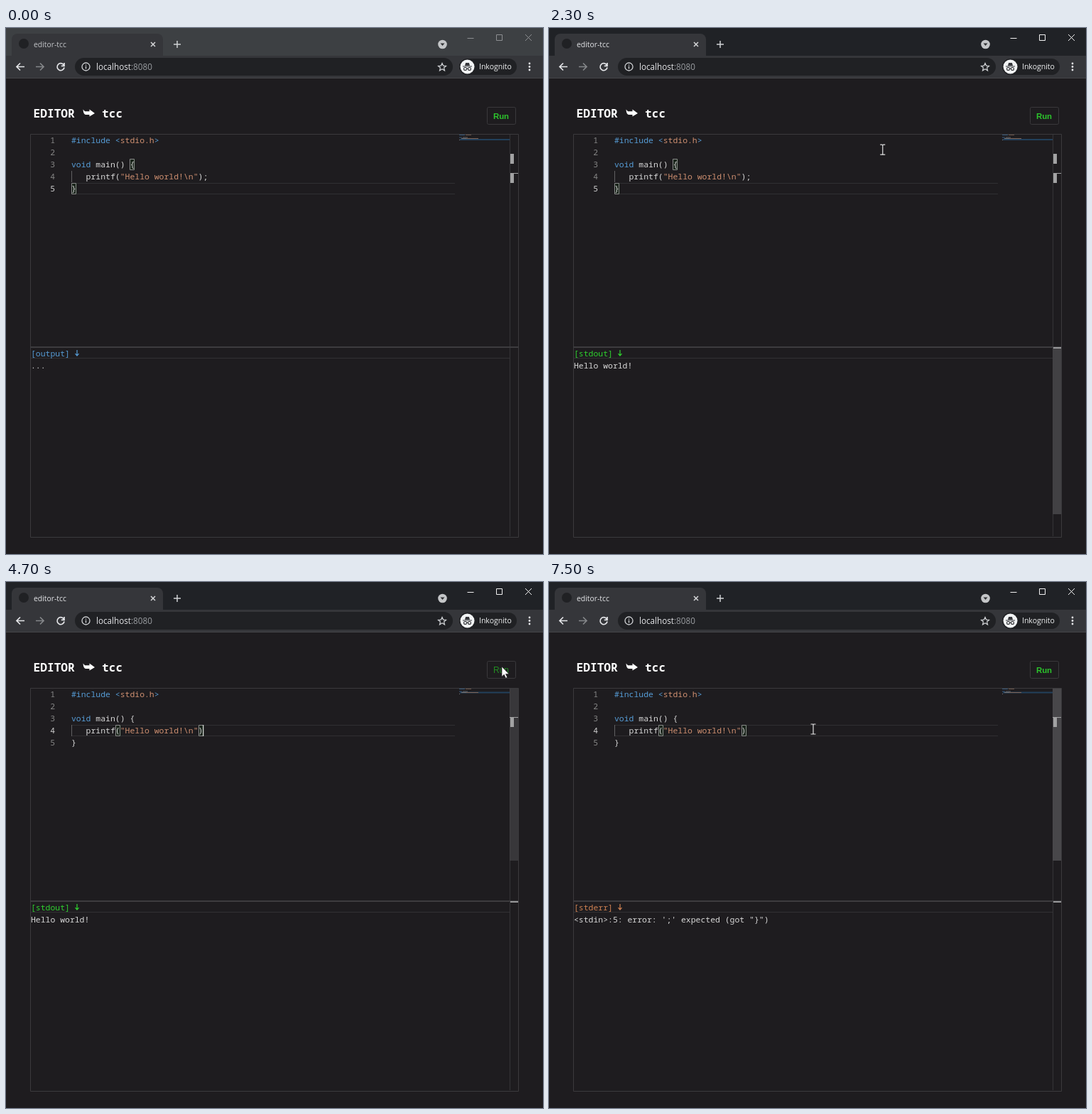
Animation of 756x740 px, one loop 8000 ms. Source, as an HTML page with a canvas:

```html
<!DOCTYPE html>
<html lang="en">
<head>
<meta charset="utf-8">
<title>editor-tcc</title>
<style>
html, body { margin: 0; width: 100%; height: 100%; overflow: hidden; background: #1e1c1f; }
canvas { display: block; }
</style>
</head>
<body>
<canvas id="stage" width="756" height="740"></canvas>
<script>
const g = document.getElementById('stage').getContext('2d');
const LOOP = 8000, CH = 6.87, ROW = 17;
const MONO = '"Noto Sans Mono", monospace', UI = '"Open Sans", sans-serif';
const BLUE = '#569cd6', ORANGE = '#ce8f70', WHITE = '#d8d8d8', GREEN = '#2fd12f';

// Moments at which the state changes
const FOCUS = 1600, RUN_OK = 1750, SELECT = 2900, ERASE = 3450, MATCH = 4000, BLUR = 4900, RUN_BAD = 5050;
// Pointer path: time, x, y
const PATH = [[300, 520, 300], [900, 697, 119], [1850, 697, 119], [2300, 470, 171], [2700, 376, 209],
  [4000, 376, 209], [4700, 698, 119], [6000, 698, 119], [6650, 377, 204], [6900, 377, 204], [7100, 372, 207]];

function fill(x, y, w, h, c, r = 0) {
  g.fillStyle = c;
  g.beginPath();
  g.roundRect(x, y, w, h, r);
  g.fill();
}
function frame(x, y, w, h, c, r = 0) {
  g.strokeStyle = c;
  g.lineWidth = 1;
  g.beginPath();
  g.roundRect(x + .5, y + .5, w - 1, h - 1, r);
  g.stroke();
}
function disc(x, y, r, c) {
  g.fillStyle = c;
  g.beginPath();
  g.arc(x, y, r, 0, 7);
  g.fill();
}
function path(d, x, y, stroke, width = 1, inside) {
  g.save();
  g.translate(x, y);
  const p = new Path2D(d);
  if (inside) { g.fillStyle = inside; g.fill(p); }
  if (stroke) { g.strokeStyle = stroke; g.lineWidth = width; g.stroke(p); }
  g.restore();
}
function text(s, x, y, c, font, align = 'left') {
  g.font = font;
  g.fillStyle = c;
  g.textAlign = align;
  g.fillText(s, x, y);
}
const code = (s, x, y, c) => text(s, x, y, c, '11.45px ' + MONO);
const ramp = (t, a, b) => Math.min(1, Math.max(0, (t - a) / (b - a)));

function pointer(t) {
  if (t < PATH[0][0]) return null;
  const i = PATH.findIndex(p => p[0] > t);
  if (i < 0) return PATH[PATH.length - 1].slice(1);
  const [t0, x0, y0] = PATH[i - 1], [t1, x1, y1] = PATH[i], k = (t - t0) / (t1 - t0);
  return [x0 + (x1 - x0) * k, y0 + (y1 - y0) * k];
}

function browser(focused) {
  const ctl = focused ? '#f2f2f2' : '#8d8f92', light = '#e4e5e8';
  fill(0, 0, 756, 40, focused ? '#202226' : '#3d4043');
  fill(8, 8, 213, 40, '#35363a', 8);
  fill(0, 39, 756, 32, '#35363a');
  fill(0, 70, 756, 1, '#444548');
  disc(25, 22, 7, '#202124');
  text('editor-tcc', 39, 27, focused ? '#e4e5e8' : '#c3c5c8', '10.4px ' + UI);
  path('M-3-3L3 3M3-3L-3 3', 207, 23, '#d5d6d8', 1.5);
  path('M-5 0H5M0-5V5', 241, 23, '#d0d2d5', 1.5);
  disc(614.5, 23, 6.3, '#c4c6c8');
  path('M-3-1.5H3L0 2Z', 614.5, 23, null, 1, '#303134');
  path('M-4.5 0H4.5', 654, 14.5, ctl);
  frame(690, 9, 9, 9, ctl);
  path('M-4.5-4.5L4.5 4.5M4.5-4.5L-4.5 4.5', 735.5, 13.5, ctl);

  path('M6 0H-5M0-5L-5 0L0 5', 20, 54.5, light, 1.7);
  path('M-6 0H5M0-5L5 0L0 5', 48, 54.5, '#85878a', 1.7);
  path('M4.2-2.6A5 5 0 1 0 5 1M5-5.5V-1.2H.8', 77, 54.5, light, 1.7);
  fill(97, 42, 532, 25, '#202124', 12.5);
  path('M5.5 0A5.5 5.5 0 1 1-5.5 0A5.5 5.5 0 1 1 5.5 0M0-.8V3M0-3V-1.7', 112.5, 54.5, '#d0d2d5', 1.3);
  text('localhost', 127, 59, '#e4e5e8', '11.7px ' + UI);
  text(':8080', 127 + g.measureText('localhost').width, 59, '#9a9da1', '11.7px ' + UI);
  path('M0-5.5L1.6-1.9L5.5-1.6L2.5 1L3.5 5L0 2.8L-3.5 5L-2.5 1L-5.5-1.6L-1.6-1.9Z', 614, 55, '#d0d2d5', 1.2);
  fill(638, 43, 81, 23, '#202124', 11.5);
  disc(649.5, 54.5, 10, '#f1f3f4');
  path('M-3.5-1.5L-2.4-5.5H2.4L3.5-1.5ZM-6.5-.9H6.5V.1H-6.5Z', 649.5, 54.5, null, 1, '#35363a');
  path('M-1 3A2 2 0 1 1-5 3A2 2 0 1 1-1 3M5 3A2 2 0 1 1 1 3A2 2 0 1 1 5 3M-1 2.6H1', 649.5, 54.5, '#35363a', 1.1);
  text('Inkognito', 666, 58, '#f1f3f4', '500 10.5px ' + UI);
  for (const y of [50, 54.5, 59]) disc(737, y, 1.4, light);
}

function header(hover) {
  const title = 'bold 16.2px ' + MONO;
  text('EDITOR', 38.5, 125.5, '#fff', title);
  text('tcc', 135, 125.5, '#fff', title);
  path('M-8-5L-5.5-2.2H1V-5L8.5 .4L1 5V2.4H-4.5Q-7.5 2-8-5Z', 116.5, 119.5, null, 1, '#fff');
  frame(677, 111, 41, 25, '#3a393c', 2);
  text('Run', 697, 127.5, hover ? '#238c23' : '#2cc52c', (hover ? '12px' : 'bold 11.4px') + ' "Liberation Sans", sans-serif', 'center');
}

function bracket(col, row) {
  const x = Math.round(92 + col * CH), y = 150 + ROW * (row - 1);
  fill(x, y, 8, 16, 'rgba(0,100,0,.12)');
  frame(x, y, 7, 16, '#8a8a8a');
}

function editor(t, slider) {
  const row = t < SELECT ? 5 : 4, top = 150 + ROW * (row - 1), edge = '#353437';
  frame(34, 149, 688, 568, '#3b3a3d');
  fill(709, 150, 1, 565, edge);
  fill(92, top, 540, 1, '#302f32');
  fill(92, top + 15, 540, 1, '#302f32');
  fill(92, 201, 1, 16, '#606062');
  for (let n = 1; n <= 5; n++)
    text(n, 69, 145 + ROW * n, n === row ? '#d0d0d0' : '#858585', '11.45px ' + MONO, 'right');

  if (t < MATCH) { bracket(12, 3); bracket(0, 5); }
  else { bracket(9, 4); bracket(26, 4); }

  const put = (s, col, line, c = WHITE) => code(s, 92 + col * CH, 145 + ROW * line, c);
  put('#include', 0, 1, BLUE);
  put('<', 9, 1, BLUE);
  put('stdio.h', 10, 1, ORANGE);
  put('>', 17, 1, BLUE);
  put('void', 0, 3, BLUE);
  put('main() {', 5, 3);
  put('printf(', 3, 4);
  put('"Hello world!\\n"', 10, 4, ORANGE);
  put(t < ERASE ? ');' : ')', 26, 4);
  put('}', 0, 5);

  // Blinking caret; the phase restarts with each edit
  const start = t < SELECT ? 500 : t < ERASE ? SELECT : ERASE;
  const shown = t >= start && (t < FOCUS || t >= SELECT && t < BLUR) && (t - start) % 1000 < 500;
  if (shown) {
    const col = row === 5 ? 1 : t < ERASE ? 28 : 27;
    fill(Math.round(92 + col * CH), top, 1.3, 16, '#d4d4d4');
  }

  // Minimap
  fill(639, row === 5 ? 156 : 154.5, 70, 2, '#22405c');
  fill(638, 150, 8, 1, '#38597a');
  fill(647, 150, 8, 1, '#6b5549');
  fill(638, 153.5, 4, 1, '#38597a');
  fill(643, 153.5, 7, 1, '#66666a');
  fill(641, 155, 7, 1, '#77777a');
  fill(648, 155, 17, 1, '#806557');
  fill(638, 157, 1, 1, '#77777a');

  // Overview ruler and slider
  if (slider) fill(709, 150, 12, 242, `rgba(72,71,74,${slider})`);
  const mark = '#a2a2a3';
  if (t < SELECT) {
    fill(710, 177, 5, 14, mark);
    fill(710, 204, 5, 14, mark);
    fill(710, 204, 11, 1, mark);
  } else {
    fill(709, 190, 12, 1, mark);
    if (t >= MATCH) fill(710, 190, 5, 14, mark);
  }
}

function output(t, slider) {
  const [label, body, c] = t < RUN_OK ? ['output', '...', BLUE]
    : t < RUN_BAD ? ['stdout', 'Hello world!', GREEN]
    : ['stderr', '<stdin>:5: error: \';\' expected (got "}")', '#cf8152'];
  fill(34, 448, 688, 2, '#3d3c3f');
  fill(35, 464, 674, 1, '#323134');
  if (slider) fill(709, 449, 12, 235, `rgba(66,65,68,${slider})`);
  if (t >= RUN_OK) fill(710, 449, 11, 2, '#98989a');
  code(`[${label}]`, 35, 461.5, c);
  path('M0-4V4M-2.5 1.2L0 4L2.5 1.2', 100, 457, c, 1.2);
  code(body, 35, 478.5, WHITE);
}

function drawPointer(x, y) {
  if (y > 150) path('M-3.5-7H-1Q0-7 0-6V6Q0 7-1 7H-3.5M3.5-7H1Q0-7 0-6M0 6Q0 7 1 7H3.5', x, y, '#e0e0e0', 1.2);
  else path('M0 0V14.2L3.2 11.2L5.5 16.2L7.8 15.2L5.5 10.4H10Z', x, y, '#222', .7, '#fff');
}

function draw() {
  const t = performance.now() % LOOP, at = pointer(t);
  const hover = at && at[0] > 677 && at[0] < 718 && at[1] > 111 && at[1] < 136;
  const codeBar = t < 4400 ? ramp(t, 2350, 2450) : t < 6000 ? 1 - ramp(t, 4400, 5200) : ramp(t, 6300, 6400);
  const outBar = t < RUN_OK ? 0 : t < RUN_BAD ? 1 - ramp(t, 2300, 2850) : 1 - ramp(t, 5450, 6050);
  fill(0, 0, 756, 740, '#1e1c1f');
  browser(t >= FOCUS);
  header(hover);
  editor(t, codeBar);
  output(t, outBar);
  if (at) drawPointer(...at);
  requestAnimationFrame(draw);
}
draw();
</script>
</body>
</html>
```
